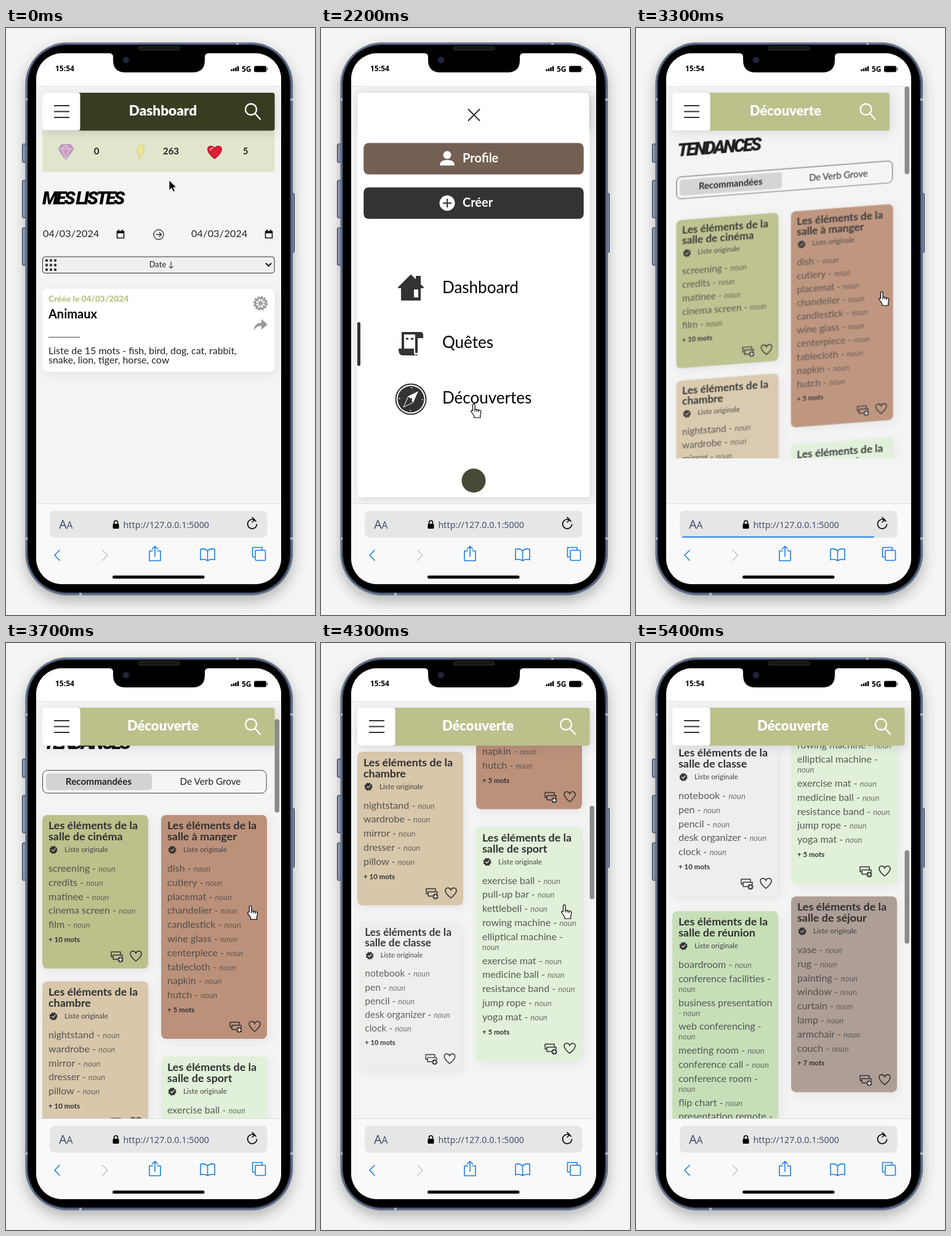
These frames come from a looping animation (502x952 px, 5.7 s). An HTML page:

```html
<!DOCTYPE html>
<html lang="fr">
<head>
<meta charset="utf-8">
<title>Listes de mots</title>
<style>
  html, body { margin: 0; width: 100%; height: 100%; overflow: hidden; background: #f5f5f5; }
  svg { display: block; width: 502px; height: 952px; font-family: Lato, "Open Sans", sans-serif; }
  .bold { font-weight: 700; }
  .black { font-weight: 900; }
  .mid { text-anchor: middle; }
  .display { font: italic 900 30px Roboto, Inter, sans-serif; letter-spacing: -3.2px; }
  .ui { font-family: "Noto Sans", "Open Sans", sans-serif; }
  .line { fill: none; stroke-linecap: round; stroke-linejoin: round; }
  .noun { font-size: 13px; font-style: italic; fill-opacity: .72; }
  .card { filter: drop-shadow(3px 4px 7px rgba(30, 30, 70, .07)); }
  .bar { filter: drop-shadow(3px 3px 8px rgba(30, 30, 70, .12)); }
</style>
</head>
<body>
<svg viewBox="0 0 502 952">
  <defs>
    <filter id="shadow" x="-20%" y="-10%" width="140%" height="120%">
      <feDropShadow dx="0" dy="9" stdDeviation="11" flood-opacity=".28"/>
    </filter>
    <clipPath id="screen"><rect x="49" y="41" width="398" height="861" rx="42"/></clipPath>
    <clipPath id="view"><rect id="viewBox" x="49" y="135" width="398" height="636"/></clipPath>
    <clipPath id="panelClip"><rect id="panelBox" x="59" y="105" rx="4"/></clipPath>
    <path id="heart" d="M0 8C-5 4-9 0-9-4C-9-9-2-10 0-5C2-10 9-9 9-4C9 0 5 4 0 8Z"/>
    <g id="calendar"><path d="M-5.500-4.500h11v10h-11z" fill="none" stroke="#111" stroke-width="1.600"/><path d="M-6-6H6v4H-6zM-4-8h2v3h-2zM2-8h2v3H2z" fill="#111"/></g>
    <g id="glass" class="line" stroke="#fff" stroke-width="2.400"><circle cx="398" cy="132" r="9"/><path d="M405 139l8 9"/></g>
    <g id="burger"><rect x="59" y="105" width="61.500" height="61.500" rx="4" fill="#fff"/><path d="M78 126h25M78 135.500h25M78 145h25" stroke="#333" stroke-width="1.800"/></g>
    <g id="stack" class="line" stroke="#333" stroke-width="1.500"><path d="M4 4H-6V-3H9V0M-6 0H-9V-8H6V-3"/><circle cx="6" cy="4.500" r="4.500" fill="#333" stroke="none"/><path d="M3.500 4.500h5M6 2v5" stroke="#fff"/></g>
  </defs>

  <rect width="502" height="952" fill="#f5f5f5"/>
  <g fill="#9aa7bd" stroke="#27324a">
    <rect x="26.500" y="188" width="6" height="30" rx="2"/>
    <rect x="26.500" y="247" width="6" height="61" rx="2"/>
    <rect x="26.500" y="324" width="6" height="61" rx="2"/>
    <rect x="464" y="268" width="4.500" height="96" rx="2"/>
  </g>
  <rect x="31.500" y="23.500" width="434.500" height="896.500" rx="68" fill="#43506a" filter="url(#shadow)"/>
  <rect x="33" y="25" width="431.500" height="893.500" rx="66.500" fill="none" stroke="#8d9db7"/>
  <path d="M32 116h5M461 116h5M32 828h5M461 828h5M376 24v4M121 915v5" stroke="#a9b2c0" stroke-width="4"/>
  <rect x="35.500" y="27.500" width="426" height="888" rx="63" stroke="#1d2636"/>
  <rect x="215" y="30" width="67" height="6" rx="3" fill="#151515" stroke="#333"/>

  <g clip-path="url(#screen)">
    <rect x="49" y="41" width="398" height="861" fill="#f4f4f4"/>

    <g id="dashboard">
      <g id="dashBody">
        <rect x="59" y="105" width="377.500" height="129" rx="4" fill="#e0e5cc"/>
        <path d="M85 196l5-7h15l5 7-13 18z" fill="#d98fc0" stroke="#9b86ad"/>
        <path d="M86 196h23M97 213l-6-17 6-6 6 6z" class="line" stroke="#bcd8da" stroke-width="1.500"/>
        <path d="M216 190h9l-4 8h5l-11 16 2-12h-5z" fill="#eee58d" stroke="#d2c565" stroke-width=".7"/>
        <use href="#heart" transform="translate(339 202) scale(1.250)" fill="#e01c37" stroke="#a4142a"/>
        <path d="M332 198q1-4 4-3" class="line" stroke="#ff98a2" stroke-width="2"/>
        <g class="mid bold" font-size="15" fill="#222"><text x="147" y="205">0</text><text x="268" y="205">263</text><text x="389" y="205">5</text></g>
        <text class="display" x="59" y="286">MES LISTES</text>
        <g font-size="16" letter-spacing=".3" fill="#222"><text x="60" y="339">04/03/2024</text><text x="301" y="339">04/03/2024</text></g>
        <use href="#calendar" x="186" y="335"/><use href="#calendar" x="427" y="335"/>
        <g class="line" stroke="#333" stroke-width="1.300"><circle cx="248" cy="335" r="8"/><path d="M244 335h8M249 331.500l3.500 3.500-3.500 3.500"/></g>
        <rect x="59.500" y="371" width="376.500" height="26.500" rx="4" fill="#efefef" stroke="#333"/>
        <path d="M66 377h16M66 384.500h16M66 392h16" stroke="#333" stroke-width="4.400" stroke-linecap="round" stroke-dasharray="0 7"/>
        <text class="mid" x="253" y="388" font-size="13" fill="#222">Date ↓</text>
        <path d="M422.500 382l4 4 4-4" class="line" stroke="#111" stroke-width="2"/>
        <rect class="card" x="59" y="423" width="377.500" height="134.500" rx="8" fill="#fff"/>
        <text class="black" x="69" y="444" font-size="13.700" fill="#bfc68a">Créée le 04/03/2024</text>
        <text class="bold" x="69" y="471" font-size="20">Animaux</text>
        <path d="M69 501.500h51" stroke="#444"/>
        <g font-size="16" fill="#222"><text x="69" y="529">Liste de 15 mots - fish, bird, dog, cat, rabbit,</text><text x="69" y="544">snake, lion, tiger, horse, cow</text></g>
        <g fill="none" stroke="#999"><circle cx="413.500" cy="446.500" r="8.500" stroke-width="2.500"/><circle cx="413.500" cy="446.500" r="10.500" stroke-width="2.500" stroke-dasharray="3.300 2.200"/><path d="M405 446.500h17M413.500 438v17M407.500 440.500l12 12M419.500 440.500l-12 12" stroke-width="1.500"/></g>
        <path d="M402 491q2-13 13-13v-6l10 9-10 8v-6q-8 0-13 8z" fill="#999"/>
      </g>
      <rect class="bar" x="59" y="105" width="377.500" height="61.500" rx="4" fill="#383d22"/>
      <text class="mid black" x="255" y="142" font-size="22.500" fill="#fff">Dashboard</text>
      <use href="#glass"/><use href="#burger"/>
    </g>

    <g id="menu">
      <rect id="panel" class="bar" x="59" y="105" rx="4" fill="#fff"/>
      <g clip-path="url(#panelClip)"><g id="menuItems">
        <path id="close" d="M-9-9L9 9M9-9L-9 9" class="line" stroke="#222" stroke-width="1.800"/>
        <rect id="profileBox" rx="8" fill="#745f53"/>
        <g id="profile" fill="#fff"><circle cx="-43" cy="-6" r="6.500"/><path d="M-55 11q0-9 12-9t12 9z"/><text class="bold" x="-18" y="6" font-size="20">Profile</text></g>
        <rect id="createBox" rx="8" fill="#333"/>
        <g id="create" fill="#fff"><circle cx="-43" cy="0" r="12.500"/><path d="M-50 0h14M-43-7v14" stroke="#333" stroke-width="2"/><text class="bold" x="-18" y="6" font-size="20">Créer</text></g>
        <g font-size="26">
          <g id="row0"><path d="M-20 0L0-20 9-11V-18h6v13l5 5h-5v20h-30V0z" fill="#333" stroke="#333" stroke-linejoin="round" stroke-width="2"/><path d="M5 3h7v13H5z" fill="#fff"/><text x="51" y="9">Dashboard</text></g>
          <g id="row1"><path d="M-13 8V-17H14M9-17V15" fill="none" stroke="#333" stroke-width="4"/><path d="M9-19h8q4 1 3 10H9zM-20 8H5v7q1 5 6 2v2h-25q-6 0-6-11z" fill="#333"/><path d="M-8-8h4M0-8h4" stroke="#333" stroke-width="3"/><text x="51" y="7">Quêtes</text></g>
          <g id="row2"><circle r="24.500" fill="#fff" stroke="#333" stroke-width="2"/><circle r="21.500" fill="#333"/><circle r="18.500" fill="none" stroke="#fff" stroke-width="2" stroke-dasharray="1.500 27.560"/><path d="M12-13L4 5-12 13-4-5z" fill="#fff"/><path d="M-12 13L-4-5 4 5z" fill="#333" stroke="#fff"/><circle r="2" fill="#333"/><text x="51" y="7">Découvertes</text></g>
        </g>
        <rect id="marker" width="5" rx="2.500" fill="#333"/>
        <circle id="emblem" r="19.500" fill="#484a38"/>
      </g></g>
    </g>

    <g id="discover">
      <g clip-path="url(#view)"><g id="feed">
        <text class="display" x="61" y="7" fill="#111">TENDANCES</text>
        <rect x="59.500" y="41.500" width="363.500" height="37" rx="8" fill="#f5f5f5" stroke="#444"/>
        <rect x="65" y="46.500" width="172" height="27" rx="5" fill="#d3d3d3"/>
        <g class="mid" font-size="15.300" fill="#222"><text class="bold" x="150.500" y="65">Recommandées</text><text x="332" y="65">De Verb Grove</text></g>
      </g></g>
      <g id="header">
        <rect id="headerBox" class="bar" x="59" y="105" height="61.500" rx="4" fill="#bcc08b"/>
        <text id="headerTitle" class="mid black" x="255" y="142" font-size="22" fill="#fff">Découverte</text>
        <use id="headerGlass" href="#glass"/><use href="#burger"/>
      </g>
      <rect id="thumb" x="436.500" width="7.500" rx="3.500" fill="#8b8b8b"/>
    </g>

    <rect x="49" y="41" width="398" height="53.500" fill="#fff"/>
    <path d="M49 94.500h398" stroke="#e4e4e4"/>
    <path d="M168 41q6 0 6 6v5q0 20 20 20h109q20 0 20-20v-5q0-6 6-6z"/>
    <circle cx="195" cy="52" r="6" fill="#14151d"/><circle cx="195" cy="52" r="3.200" fill="#1c2144" stroke="#34385a"/>
    <g class="ui" font-weight="600" font-size="12"><text x="80" y="70">15:54</text><text x="383" y="71">5G</text></g>
    <path d="M366.500 70v-3M370 70v-4.500M373.500 70v-6M377 70v-8" stroke="#000" stroke-width="2.500"/>
    <rect x="403" y="61.500" width="20" height="10" rx="2.500"/><path d="M424.500 64.500v4" stroke="#000"/>

    <rect x="49" y="771" width="398" height="131" fill="#f9f9f9"/>
    <path d="M49 771.500h398" stroke="#dedede"/>
    <rect x="71" y="783" width="353.500" height="43.500" rx="8" fill="#e6e6e7"/>
    <rect id="loading" x="75" y="824.500" height="2" rx="1" fill="#1e7fe0"/>
    <g class="ui" fill="#46516a"><text x="86" y="812" font-size="20">A</text><text x="98.500" y="812" font-size="15.500">A</text><text x="190.500" y="811" font-size="14.300">http://127.0.0.1:5000</text></g>
    <rect x="173.500" y="804" width="10" height="8" rx="1.500"/><path d="M175.500 804v-2a3 3 0 016 0v2" fill="none" stroke="#000" stroke-width="1.600"/>
    <path d="M406 800a7.500 7.500 0 10 1.500 5M400 794l4 3.500-4 4" class="line" stroke="#111" stroke-width="1.700"/>
    <g class="line" stroke="#1e7fe0" stroke-width="1.600">
      <path d="M87 847l-8 8 8 8.500"/><path d="M157 847l8 8-8 8.500" stroke="#c6c6c8"/>
      <path d="M238 848h-5v16h18v-16h-5M242 857v-16M237.500 845l4.500-4.500 4.500 4.500"/>
      <path d="M327.500 848q-5-5-11.500-2.500v17q6.500-2 11.500 1.500 5-3.500 11.500-1.500v-17q-6.500-2.500-11.500 2.500zV864"/>
      <path d="M404 858h-3.500v-15.500h15.500v4"/><rect x="405" y="847" width="16.500" height="16.500" rx="2"/>
    </g>
    <rect x="173" y="888" width="149.500" height="5" rx="2.500"/>
  </g>

  <path id="arrow" d="M0 0V16L4 12.500 7 18.500 9.500 17.500 6.800 11.500H12Z" stroke="#fff" stroke-width=".8"/>
  <path id="hand" d="M-1.500 1.500a1.800 1.800 0 013.600 0V8l8 2q2 .6 1.700 3l-1 5v4h-10v-3l-5-7q0-2.500 2.700-1.500zM2 8v4M5 9v3M8 10v3" fill="#fff" stroke="#000" stroke-width="1.200" stroke-linejoin="round"/>
</svg>

<script>
const LOOP = 5700, STEP = 100;
const $ = id => document.getElementById(id);
const set = (id, attrs) => { for (const k in attrs) $(id).setAttribute(k, attrs[k]); };
const show = (id, on) => set(id, { visibility: on ? "visible" : "hidden" });
const move = (id, x, y) => set(id, { transform: `translate(${x} ${y})` });
const clamp = v => Math.min(1, Math.max(0, v));
const progress = (t, from, to) => clamp((t - from) / (to - from));
const smooth = p => p * p * (3 - 2 * p);

// Linear interpolation through [time, value] pairs.
function track(t, keys) {
  let [t0, v0] = keys[0];
  for (const [t1, v1] of keys) {
    if (t < t1) return v0 + (v1 - v0) * progress(t, t0, t1);
    [t0, v0] = [t1, v1];
  }
  return v0;
}

// A trailing "/" puts "noun" on its own line, "//" puts "- noun" there.
const cards = [
  { x: 59, y: 114, fill: "#bcc08b", room: "salle de cinéma", more: 10, words: "screening,credits,matinee,cinema screen,film" },
  { x: 252, y: 114, fill: "#bc917a", room: "salle à manger", more: 5, words: "dish,cutlery,placemat,chandelier,candlestick,wine glass,centerpiece,tablecloth,napkin,hutch" },
  { x: 59, y: 384, fill: "#d8c7ab", room: "chambre", more: 10, words: "nightstand,wardrobe,mirror,dresser,pillow" },
  { x: 252, y: 506, fill: "#e0f0d9", room: "salle de sport", more: 5, words: "exercise ball,pull-up bar,kettlebell,rowing machine,elliptical machine/,exercise mat,medicine ball,resistance band,jump rope,yoga mat" },
  { x: 59, y: 656, fill: "#eeefec", room: "salle de classe", more: 10, words: "notebook,pen,pencil,desk organizer,clock", appear: 3990 },
  { x: 252, y: 906, fill: "#ae9f96", room: "salle de séjour", more: 7, words: "vase,rug,painting,window,curtain,lamp,armchair,couch", appear: 4355 },
  { x: 59, y: 930, fill: "#c7dfb9", room: "salle de réunion", more: 10, words: "boardroom,conference facilities/,business presentation//,web conferencing/,meeting room,conference call,conference room/,flip chart,presentation remote/,video conference/", appear: 4462 }
];

function cardMarkup(card, i) {
  const w = 172;
  let y = 92, list = "";
  for (const entry of card.words.split(",")) {
    const word = entry.replace(/\/+$/, ""), breaks = entry.length - word.length;
    const noun = `<tspan class="noun"${breaks ? ` x="10" dy="16"` : ""}>${breaks === 2 ? "- " : ""}noun</tspan>`;
    list += `<text x="10" y="${y}">${word}${breaks === 2 ? "" : " - "}${noun}</text>`;
    y += 22.8 + (breaks ? 16 : 0);
  }
  card.h = y + 43;
  return `<g id="card${i}" class="card">
    <rect width="${w}" height="${card.h}" rx="8" fill="${card.fill}"/>
    <g class="bold" font-size="17.9" fill="#303030"><text x="10" y="23">Les éléments de la</text><text x="10" y="41">${card.room}</text></g>
    <circle cx="18" cy="56.5" r="5.5" fill="#333" stroke="#333" stroke-width="2" stroke-dasharray="2.6 1.7"/>
    <path d="M15.500 56.500l2 2 3.500-4" class="line" stroke="${card.fill}" stroke-width="1.300"/>
    <text x="36" y="60" font-size="11.700" fill="#444">Liste originale</text>
    <g font-size="16" fill="#444" fill-opacity=".88">${list}</g>
    <text class="bold" x="10" y="${y}" font-size="11.500" fill="#303030">+ ${card.more} mots</text>
    <use href="#stack" x="${w - 51}" y="${card.h - 19}"/>
    <use href="#heart" x="${w - 20}" y="${card.h - 20}" fill="none" stroke="#333" stroke-width="1.600"/>
  </g>`;
}
$("feed").insertAdjacentHTML("beforeend", cards.map(cardMarkup).join(""));

function drawMenu(t) {
  const p = smooth(progress(t, 900, 1400));
  // Each pair holds a value part-way through opening and when open.
  const mix = (part, open) => open + (part - open) * (1 - p) / 0.352;
  const size = { width: 61 + 316.5 * p, height: 61 + 595 * p };
  set("panel", size);
  set("panelBox", size);
  show("menu", t >= 900 && t < 2800);
  set("menu", { opacity: 1 - progress(t, 2400, 2800) });
  set("menuItems", { opacity: p });
  move("close", mix(194, 248.5), mix(132, 141));
  const width = Math.max(0, mix(184, 357.5)), height = Math.max(0, mix(33, 51));
  const center = mix(184, 248);
  [["profile", 186.5, 212], ["create", 240.5, 284]].forEach(([id, part, open]) => {
    const y = mix(part, open);
    set(id + "Box", { x: center - width / 2, y: y - height / 2, width, height });
    move(id, center, y);
  });
  [[327, 421], [393, 512], [460, 602]].forEach(([part, open], i) => move("row" + i, mix(82, 146), mix(part, open)));
  set("marker", { x: mix(86, 59), y: mix(341, 477), height: Math.max(0, mix(40, 71)) });
  move("emblem", center, mix(538, 734));
  set("dashBody", { opacity: 1 - p });
  show("dashboard", t < 2500);
}

function drawDiscover(t) {
  const enter = progress(t, 3000, 3600), settled = enter === 1;
  const shift = settled ? 0 : -24.5;
  show("discover", t >= 2700);
  set("header", { opacity: progress(t, 2600, 2900) });
  set("headerBox", { width: 377.5 + shift });
  move("headerTitle", shift / 2, 0);
  move("headerGlass", shift, 0);
  set("viewBox", { height: settled ? 636 : 563 });

  const scroll = track(t, [[3600, -184.5], [3700, -165], [4000, 0], [4200, 125], [4400, 290], [4600, 429], [4800, 455], [5100, 482], [5400, 495]]);
  const tilt = 8.7 * (1 - enter), scale = 0.93 + 0.07 * enter;
  set("feed", {
    opacity: clamp(enter * 1.9),
    transform: `translate(241 298.5) skewY(${-tilt}) scale(${scale}) translate(-241 ${-298.5 - scroll})`
  });
  cards.forEach((card, i) => {
    const p = card.appear ? progress(t, card.appear, card.appear + 400) : 1;
    const eased = 1 - (1 - p) ** 2, s = 0.4 + 0.6 * eased;
    set("card" + i, {
      opacity: eased,
      transform: `translate(${card.x + 86 * (1 - s)} ${card.y + card.h / 2 * (1 - s)}) scale(${s})`
    });
  });
  show("thumb", t >= 3000);
  set("thumb", {
    y: track(t, [[3600, 95], [4000, 209], [4600, 319], [5400, 336]]),
    height: settled ? 151.5 : 142
  });
  show("loading", t >= 2500 && t < 3600);
  set("loading", { width: track(t, [[2500, 10], [3300, 312], [3600, 347]]) });
}

function drawCursor(t) {
  const x = track(t, [[0, 265], [600, 94], [1400, 94], [1800, 248], [2500, 248], [3100, 400], [3300, 399], [4000, 395]]);
  const y = track(t, [[0, 247], [600, 143], [1400, 143], [1800, 610], [2500, 610], [3100, 430], [3300, 428], [4000, 425]]);
  const hand = (t >= 700 && t < 1100) || t >= 1800;
  show("hand", hand && t < 4900);
  show("arrow", !hand);
  move("hand", x, y);
  move("arrow", x, y);
}

function frame(now) {
  const t = Math.floor(now % LOOP / STEP) * STEP;
  drawMenu(t);
  drawDiscover(t);
  drawCursor(t);
  requestAnimationFrame(frame);
}
frame(0);
</script>
</body>
</html>
```
